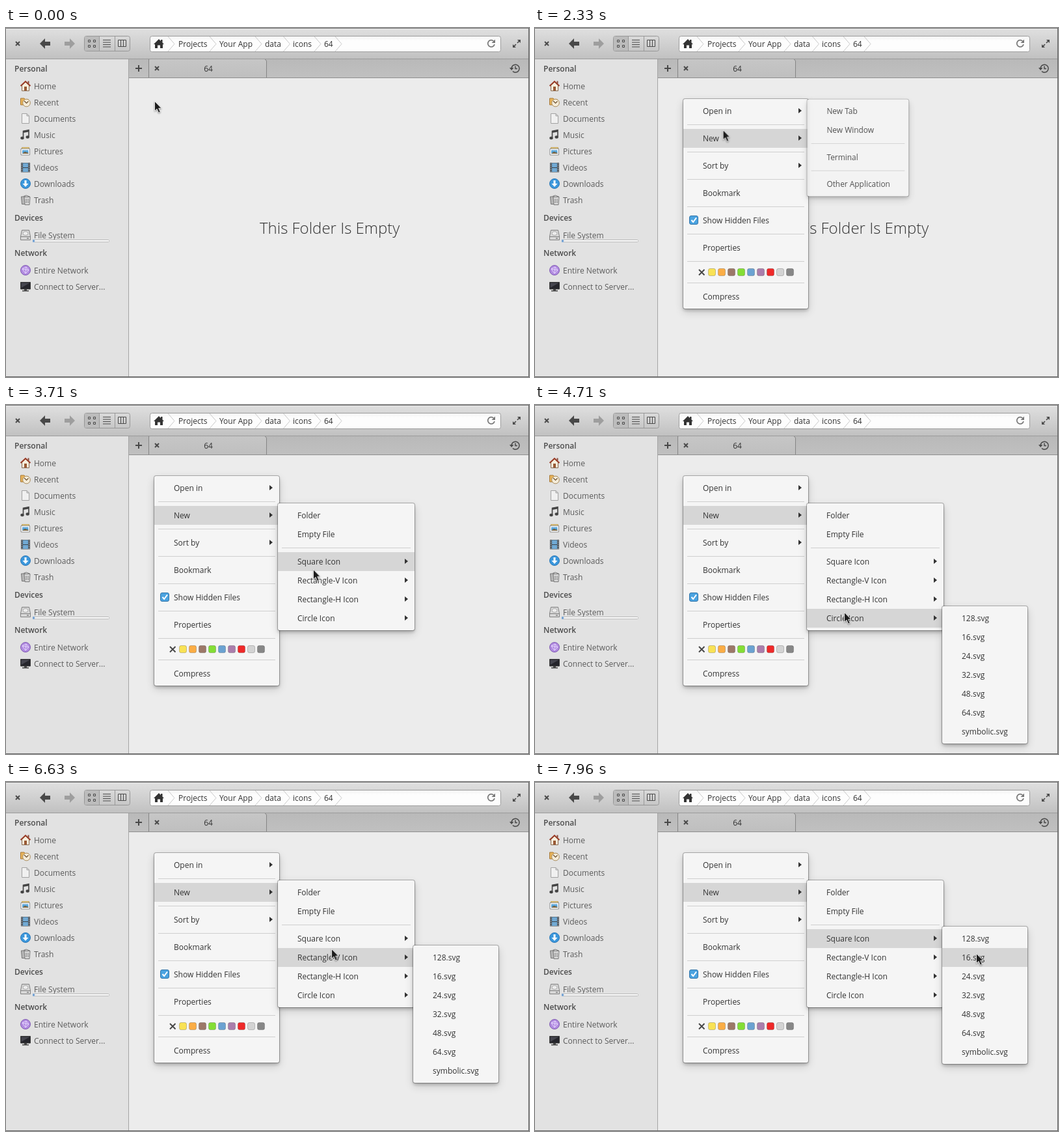
An HTML page for the animation above (8 s loop, 804 by 536 pixels).

```html
<!DOCTYPE html>
<html lang="en">
<head>
<meta charset="utf-8">
<title>File manager menus</title>
<style>
html, body { margin: 0; width: 100%; height: 100%; overflow: hidden; }
body { position: relative; background: #ececec; font: 12px "Open Sans", sans-serif; color: #333; }
svg { position: absolute; left: 0; top: 0; overflow: visible; }
.side { fill: #5b5b5b; }
.head { fill: #4c4c4c; font-weight: 600; }
.ink { fill: none; stroke: #4a4a4a; }

.place { position: absolute; }
.menu {
  position: relative; box-sizing: border-box; padding: 4px 0; overflow: hidden;
  background: #f5f5f5; border-radius: 3px;
  box-shadow: 0 0 0 1px rgba(0,0,0,.27), 0 3px 5px rgba(0,0,0,.22), 0 5px 14px rgba(0,0,0,.16);
}
.hover { position: absolute; left: 0; top: -40px; width: 100%; height: 29px; background: #d6d6d6; }
.row { position: relative; height: 29px; line-height: 29px; padding-left: 30px; white-space: pre; }
.row.more::after {
  content: ""; position: absolute; right: 10px; top: 10px;
  border: solid transparent; border-width: 4px 0 4px 5px; border-left-color: #333;
}
.sep { position: relative; height: 13px; }
.sep::after { content: ""; position: absolute; left: 6px; right: 6px; top: 6px; height: 1px; background: #cfcfcf; }
.labels { position: relative; height: 20px; }
.row svg { left: 9px; top: 7px; }

/* One loop is 8 s, so 1% is 80 ms. */
.menu { animation: 8s ease-out infinite; }
.hover { animation: 8s step-end infinite; }
#main .menu { animation-name: main-fade; }
#open .menu { animation-name: open-fade; }
#new .menu { animation-name: new-fade; }
#sizes .menu { animation-name: sizes-fade; }
#main .hover { animation-name: main-hover; }
#open .hover { animation: none; }
#new .hover { animation-name: new-hover; }
#sizes .hover { animation-name: sizes-hover; }
#sizes { animation: sizes-place 8s step-end infinite; }
#cursor { animation: cursor-path 8s linear infinite; }

@keyframes main-fade {
  0%, 15.8% { opacity: 0; transform: scale(.95); }
  18.3%, 100% { opacity: 1; transform: none; }
}
@keyframes open-fade {
  0%, 18.4%, 31.2%, 100% { opacity: 0; transform: scale(.95); }
  20.875%, 28.9% { opacity: 1; transform: none; }
}
@keyframes new-fade {
  0%, 32.7% { opacity: 0; transform: scale(.95); }
  35.3%, 100% { opacity: 1; transform: none; }
}
@keyframes sizes-fade {
  0%, 53.8%, 63.4%, 65.3%, 74.8%, 75.8%, 85.8%, 88% { opacity: 0; transform: scale(.95); }
  56.2%, 61%, 67.7%, 72.4%, 78.1%, 83.4%, 90.5%, 100% { opacity: 1; transform: none; }
}
@keyframes sizes-place {
  0% { top: 309px; }
  64.4% { top: 280px; }
  75.3% { top: 251px; }
  87% { top: 222px; }
}
@keyframes main-hover {
  0% { top: 4px; }
  28.9% { top: 46px; }
}
@keyframes new-hover {
  0% { top: -40px; }
  39.875% { top: 4px; }
  40.4% { top: 33px; }
  41.54%, 46.3%, 83.4% { top: 75px; }
  42.14%, 45.2%, 46.55%, 72.4% { top: 104px; }
  42.7%, 48.25%, 61% { top: 133px; }
  50.2% { top: 162px; }
}
@keyframes sizes-hover {
  0% { top: -40px; }
  95.25% { top: 4px; }
  97.9% { top: 33px; }
}
@keyframes cursor-path {
  0%, 25.2% { transform: translate(228px, 112px); }
  27.5% { transform: translate(252px, 135px); }
  29.2% { transform: translate(290px, 157px); }
  32%, 36% { transform: translate(322px, 167px); }
  37% { transform: translate(314px, 167px); }
  38% { transform: translate(345px, 168px); }
  40% { transform: translate(425px, 172px); }
  41.25% { transform: translate(450px, 212px); }
  42.75% { transform: translate(468px, 285px); }
  43.75% { transform: translate(473px, 308px); }
  45% { transform: translate(472px, 290px); }
  46.375% { transform: translate(472px, 252px); }
  47.5% { transform: translate(472px, 270px); }
  49.1% { transform: translate(473px, 300px); }
  51%, 58.4% { transform: translate(474px, 321px); }
  58.875% { transform: translate(475px, 318px); }
  61% { transform: translate(482px, 312px); }
  63%, 70.8% { transform: translate(488px, 300px); }
  72.4% { transform: translate(492px, 283px); }
  73.75%, 80.7% { transform: translate(496px, 271px); }
  82.875% { transform: translate(500px, 256px); }
  83.4% { transform: translate(502px, 253px); }
  87%, 91% { transform: translate(515px, 237px); }
  93.1% { transform: translate(560px, 236px); }
  95.25% { transform: translate(626px, 240px); }
  97.2% { transform: translate(662px, 251px); }
  97.9% { transform: translate(668px, 255px); }
  99.5%, 100% { transform: translate(678px, 263px); }
}
</style>
</head>
<body>
<svg width="804" height="536" viewBox="0 0 804 536">
  <defs>
    <linearGradient id="bar" x2="0" y2="1"><stop stop-color="#e0e0e0"/><stop offset="1" stop-color="#c1c1c1"/></linearGradient>
    <linearGradient id="tabs" x2="0" y2="1"><stop stop-color="#b9b9b9"/><stop offset="1" stop-color="#c0c0c0"/></linearGradient>
    <linearGradient id="tab" x2="0" y2="1"><stop stop-color="#c6c6c6"/><stop offset="1" stop-color="#bfbfbf"/></linearGradient>
    <linearGradient id="button" x2="0" y2="1"><stop stop-color="#dadada"/><stop offset="1" stop-color="#c6c6c6"/></linearGradient>
    <linearGradient id="field" x2="0" y2="1"><stop stop-color="#f3f3f3"/><stop offset=".3" stop-color="#fdfdfd"/></linearGradient>
    <path id="cross" d="M-3-3 3 3M3-3-3 3" fill="none" stroke="#4a4a4a" stroke-width="2"/>
    <path id="back" d="M-8 0 0-8V-3H8V3H0V8Z"/>
  </defs>

  <!-- Window surfaces -->
  <rect y="48" width="188" height="488" fill="#e2e2e2"/>
  <path d="M188.5 48V536" stroke="#a5a5a5"/>
  <rect width="804" height="47" fill="url(#bar)"/>
  <path d="M0 1.5H804" stroke="#ededed"/>
  <rect x="189" y="48" width="615" height="28" fill="url(#tabs)"/>
  <path d="M220 76V51Q220 48 223 48H398Q401 48 401 51V76Z" fill="url(#tab)"/>
  <path d="M219.5 76V48M400.5 76V51Q400.5 48.5 398 48.5" fill="none" stroke="#858585"/>
  <path d="M189 76.5H804" stroke="#8e8e8e"/>
  <path d="M0 47.5H804" stroke="#9b9b9b"/>

  <!-- Toolbar -->
  <use href="#cross" x="18" y="24"/>
  <use href="#back" x="60" y="24" fill="#484848"/>
  <use href="#back" transform="matrix(-1 0 0 1 98 24)" fill="#9e9e9e"/>
  <rect x="120.5" y="12.5" width="70" height="23" rx="3" fill="url(#button)" stroke="#979797"/>
  <path d="M121 15Q121 13 123 13H143V35H123Q121 35 121 33Z" fill="#bcbcbc"/>
  <path d="M143.5 13V35M167.5 13V35" stroke="#999"/>
  <path class="ink" d="M126.5 18.5h3v3h-3zM134.5 18.5h3v3h-3zM126.5 26.5h3v3h-3zM134.5 26.5h3v3h-3zM149 18.5h12M149 22h12M149 25.5h12M149 29h12"/>
  <path class="ink" d="M172.5 18.5h12v10h-12zM176.5 18.5v10M180.5 18.5v10"/>
  <rect x="221.5" y="12.5" width="539" height="24" rx="3" fill="url(#field)" stroke="#9d9d9d"/>
  <path d="M227 25 235 17 238 20V18h2.500v4.500L243 25H241V31H237V26.500H233V31H229V25Z" fill="#333"/>
  <g id="chevrons" fill="none" stroke="#c9c9c9"></g>
  <g fill="#333">
    <text x="265" y="29">Projects</text>
    <text x="328" y="29">Your App</text>
    <text x="398" y="29">data</text>
    <text x="441" y="29">icons</text>
    <text x="489" y="29">64</text>
    <text x="311" y="67" text-anchor="middle">64</text>
  </g>
  <path d="M749.500 20A5.200 5.200 0 1 0 751 25" fill="none" stroke="#777" stroke-width="1.700"/>
  <path d="M752 17.500V23H746.500Z" fill="#777"/>
  <path d="M786 23 789 20M784 25 781 28" stroke="#4a4a4a" stroke-width="1.700"/>
  <path d="M786 18H791V23ZM779 25V30H784Z" fill="#4a4a4a"/>

  <!-- Tab bar -->
  <path d="M199 62H209M204 57V67" stroke="#484848" stroke-width="2"/>
  <use href="#cross" x="232" y="62"/>
  <path class="ink" d="M777.200 63A6 6 0 1 1 779 66.500M783 58.500V62.500H786" stroke-width="1.500"/>
  <path d="M774 61H780.500L777.200 65Z" fill="#4a4a4a"/>

  <!-- Sidebar -->
  <g class="head">
    <text x="13" y="67">Personal</text>
    <text x="13" y="296">Devices</text>
    <text x="13" y="350">Network</text>
  </g>
  <g id="places" class="side"></g>
  <g transform="translate(30 89)">
    <path d="M-5.500-1 0-6 5.500-1V7.500H-5.500Z" fill="#f5eedc" stroke="#8a6a50"/>
    <path d="M-7.500 0 0-7 7.500 0" fill="none" stroke="#9c3f2a" stroke-width="2"/>
    <path d="M-2 1H2V7H-2Z" fill="#9a5a35"/><path d="M3.500-7.500h2v4h-2z" fill="#8b4a3a"/>
  </g>
  <g transform="translate(30 114)">
    <path d="M-7.500-6H-2L-.5-4.500H4V4H-7.500Z" fill="#e7b35a" stroke="#a77835"/>
    <circle cx="1.500" cy="1" r="5.800" fill="#f4ecd9" stroke="#a98a58"/>
    <path d="M-2-2 1.500 1.500 4.500-1.500" fill="none" stroke="#6b4d2c" stroke-width="1.200"/>
  </g>
  <path d="M24.500 131.500H32L35.500 135V146.500H24.500ZM32 131.500V135H35.500" fill="#f0f0f0" stroke="#a2a2a2"/>
  <g transform="translate(30 164)" fill="#444">
    <path d="M-3.500 4.500V-5.500L5-7.200V3" fill="none" stroke="#444" stroke-width="1.600"/>
    <path d="M-3.500-6 5-7.500V-4.500L-3.500-3Z"/>
    <ellipse cx="-5" cy="5" rx="2.700" ry="2.200"/><ellipse cx="3.200" cy="3.500" rx="2.700" ry="2.200"/>
  </g>
  <g transform="translate(30 189)">
    <path d="M-5.500-5.500H5.500V3H-5.500Z" fill="#f5d98a" stroke="#b99a55"/>
    <path d="M-7-3.500H6.500V6H-7Z" fill="#fff" stroke="#8c8c8c"/>
    <path d="M-5-1.500H4.500V4H-5Z" fill="#5aa5d8"/><path d="M-5 4-1 1 4.500 3V4Z" fill="#77603c"/>
  </g>
  <g transform="translate(30 214)">
    <path d="M-7-7H7V7.500H-7Z" fill="#3c444c"/>
    <path d="M-4-6.500H4V0H-4ZM-4 1H4V7H-4Z" fill="#71a9d3"/>
    <path d="M-5.500-6V7M5.500-6V7" stroke="#cfd5da" stroke-width="1.300" stroke-dasharray="1.500"/>
  </g>
  <g transform="translate(30 239)">
    <circle r="7.500" fill="#3b97dc" stroke="#2c78b8"/>
    <path d="M-1.500-5H1.500V0H4.500L0 5-4.500 0H-1.500Z" fill="#fff"/>
  </g>
  <g transform="translate(30 264)" stroke="#747474">
    <path d="M-6.500-5H0V6.500H-5.500Z" fill="#b7b7b7"/>
    <path d="M-2-4.500H7L6 7.500H-1Z" fill="#dcdcdc"/>
    <path d="M-3-5.500 1-7 6.500-5M1-2V5M4-2V5" fill="none"/>
  </g>
  <g transform="translate(30 318)" stroke="#808080">
    <path d="M-5.500-7.500H5.500L7.500 2V7.500H-7.500V2Z" fill="#d8d8d8"/>
    <path d="M-7 2.500H7" /><ellipse cy="-2.500" rx="4" ry="3" fill="#eee" stroke="#aaa"/><path d="M2 5H5" stroke="#555"/>
  </g>
  <rect x="41.500" y="325.500" width="117" height="3" rx="1" fill="#fff" stroke="#b7b7b7"/>
  <rect x="41" y="325" width="3" height="4" fill="#7ba6d4"/>
  <g transform="translate(30 372)">
    <circle r="7.500" fill="#b18be0" stroke="#805bb3"/>
    <path d="M-5-2 1-5 5 0 0 5ZM-5-2 5 0M1-5 0 5" fill="none" stroke="#eadcff" stroke-width=".9"/>
  </g>
  <g transform="translate(30 397)">
    <path d="M-7.500-6.500H7.500V4H-7.500Z" fill="#25252b" stroke="#3b3b3b"/>
    <path d="M-6.500-5.500H6.500L-6.500 2Z" fill="#45454e"/>
    <path d="M-2 4H2V6H5V7.500H-5V6H-2Z" fill="#444"/>
  </g>

  <text x="390" y="316" font-size="24" font-weight="300" fill="#333">This Folder Is Empty</text>
  <path d="M0 .5H804" stroke="#777"/>
  <path d="M0 535.500H804M803.500 0V536" stroke="#686868"/>
</svg>

<div id="menus"></div>

<svg id="cursor" width="20" height="24">
  <path d="M.5.5V15.500L4 12.300 6.600 18.200 9.300 17 6.700 11.300H11Z" fill="#1c1c1c" stroke="#f4f4f4" stroke-width=".9" style="filter:drop-shadow(0 1px 1px rgba(0,0,0,.4))"/>
</svg>

<script>
const byId = id => document.getElementById(id);

byId('chevrons').innerHTML = [249, 313, 383, 426.5, 474, 506]
  .map(x => `<path d="M${x} 13 ${x + 10} 24.500 ${x} 36"/>`).join('');

const places = [
  ['Home', 89], ['Recent', 114], ['Documents', 139], ['Music', 164], ['Pictures', 189],
  ['Videos', 214], ['Downloads', 239], ['Trash', 264], ['File System', 318],
  ['Entire Network', 372], ['Connect to Server...', 397],
];
byId('places').innerHTML = places
  .map(([name, y]) => `<text x="43" y="${y + 5}">${name}</text>`).join('');

const colors = ['#f9e255', '#fbad45', '#9c7868', '#84de35', '#6ba2d2', '#ab7eac', '#ef2929', '#d3d3d3', '#878787'];
const swatches = colors.map((color, i) =>
  `<rect x="${38.5 + 15 * i}" y="4.500" width="11" height="11" rx="2.500" fill="${color}" stroke="#000" stroke-opacity=".2"/>`).join('');
const labels = `<div class="labels"><svg width="192" height="20">
  <path d="M24 6 32.500 14.500M32.500 6 24 14.500" stroke="#484848" stroke-width="2"/>${swatches}</svg></div>`;
const checkbox = `<svg width="15" height="15">
  <rect x=".5" y=".5" width="13" height="13" rx="2.500" fill="#4ba3e0" stroke="#3275aa"/>
  <path d="M3.500 7 6.200 10 11 3.500" fill="none" stroke="#fff" stroke-width="2"/></svg>`;

// "-" is a separator, "#" the colour labels, a trailing ">" a submenu, a leading "*" a ticked item.
function item(text) {
  if (text === '-') return '<div class="sep"></div>';
  if (text === '#') return labels;
  const more = text.endsWith('>') ? ' more' : '';
  const tick = text.startsWith('*') ? checkbox : '';
  return `<div class="row${more}">${tick}${text.replace(/[*>]/g, '')}</div>`;
}

function addMenu(id, left, top, width, items) {
  byId('menus').insertAdjacentHTML('beforeend',
    `<div class="place" id="${id}" style="left:${left}px;top:${top}px;width:${width}px">
      <div class="menu"><div class="hover"></div>${items.split('|').map(item).join('')}</div></div>`);
}

addMenu('main', 228, 109, 192, 'Open in>|-|New>|-|Sort by>|-|Bookmark|-|*Show Hidden Files|-|Properties|-|#|-|Compress');
addMenu('open', 418, 109, 157, 'New Tab|New Window|-|Terminal|-|Other Application');
addMenu('new', 418, 151, 210, 'Folder|Empty File|-|Square Icon>|Rectangle-V Icon>|Rectangle-H Icon>|Circle Icon>');
addMenu('sizes', 626, 309, 131, '128.svg|16.svg|24.svg|32.svg|48.svg|64.svg|symbolic.svg');
</script>
</body>
</html>
```
